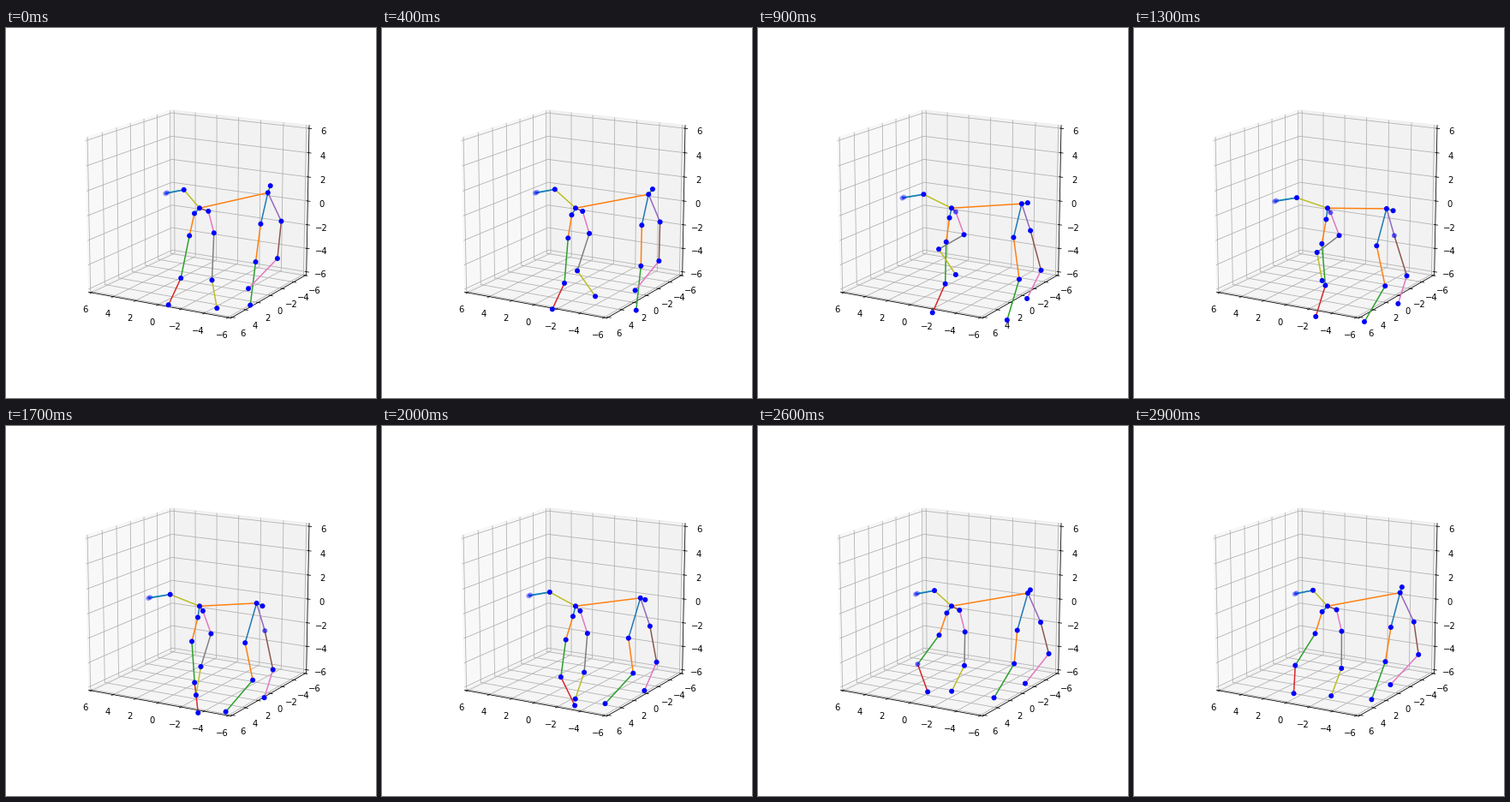
A matplotlib script for the animation above (3 s loop, 432 by 432 pixels).

```python
import numpy as np
import matplotlib.pyplot as plt
from matplotlib.animation import FuncAnimation

SIZE, FRAMES, STEP = 432, 30, 100
STRIDE = 34  # frames in one full stride
ROOT = 226 + 210.3j

# Each joint swings about its anchor once per stride. Screen vectors x + yj:
# rest offset, cosine and sine swing, then the swing at double rate.
JOINTS = {
    "l_hip": ("root", -4 + 9.7j, -2 - 3.5j, 1.4 + 1.3j),
    "l_knee": ("root", -10.4 + 36.7j, -1.4 - 4.5j, 4 + 2.4j),
    "l_hock": ("root", -18.6 + 81.9j, -8 - 3.8j, 15.4 + 10j,
               4.8 + 3.6j, 0.7 + 1.5j),
    "l_toe": ("root", -21.5 + 114.9j, -17.3 - 5.8j, 1.2 + 10.5j,
              2.5 + 3.9j, 6.1),
    "r_hip": ("root", 7.1 + 4.6j, 3.2 - 1j, -1.9 - 0.3j),
    "r_knee": ("root", 15.1 + 30.6j, 1.7 - 1.6j, -0.4 + 0.3j),
    "r_hock": ("root", 4.2 + 68.5j, 6.5 + 6.7j, -14.4 - 10.2j,
               3.8 + 8.9j, 2.4 + 5.8j),
    "r_toe": ("root", 5.8 + 99.8j, 12.2 + 6.5j, 3.5 - 10.3j,
              2.3 + 10.6j, 5.7 + 4.4j),
    "tail": ("root", -26.3 - 17.5j, 8 - 3.9j, -5.6 + 0.7j, 0, -2j),
    "tip_a": ("tail", -21.5 + 3.4j, 2, -1.3),
    "tip_b": ("tip_a", -2 + 1j),
    "chest": ("root", 79.7 - 10.7j, 6.6 - 7.3j, -3 + 4.4j, -6.5, 3.3 - 3j),
    "head": ("chest", 4.9 - 2.4j, -2 - 5.7j, 1.9 + 0.8j),
    "l_elbow": ("chest", -10.9 + 41.4j, 2.5 - 4.9j, 1.7 - 2.5j),
    "l_wrist": ("l_elbow", 1.5 + 43.9j, -7.4 + 0.4j, 4.4 + 5j),
    "l_paw": ("l_wrist", -18.9 + 43.7j, 12.6 + 6.8j, 5.9 + 4.5j),
    "r_elbow": ("chest", 12.6 + 32.7j, 3 + 0.6j, -2.1 - 1.3j),
    "r_wrist": ("r_elbow", 6.5 + 43j, -7 - 1j, 0.8 + 4.7j,
                -4 + 1.5j, -2.8),
    "r_paw": ("r_wrist", -22 + 33.9j, -11.9 + 1.2j, 4.5 - 0.7j),
}
NAMES = ["root", *JOINTS]

# Chains of joints with the colour of each bone.
CHAINS = [
    ("root l_hip l_knee l_hock l_toe", "C0 C1 C2 C3"),
    ("root r_hip r_knee r_hock r_toe", "C5 C6 C7 C8"),
    ("root tail tip_a", "C8 C9"), ("tail tip_b", "C0"),
    ("root chest head", "C1 C2"),
    ("chest l_elbow l_wrist l_paw", "C0 C1 C2"),
    ("chest r_elbow r_wrist r_paw", "C4 C5 C6"),
]
BONES = [bone for chain, colors in CHAINS
         for bone in zip(chain.split(), chain.split()[1:], colors.split())]

# Joints that pass behind their neighbours, with the middle frame of the pass.
BEHIND = {"r_hip": 11, "r_elbow": 15, "l_hock": 24}


def pose(frame):
    """Place of every joint as a complex pixel coordinate."""
    phase = 2 * np.pi * frame / STRIDE
    waves = [1, np.cos(phase), np.sin(phase),
             np.cos(2 * phase), np.sin(2 * phase)]
    joints = {"root": ROOT}
    for name, (anchor, *swings) in JOINTS.items():
        joints[name] = joints[anchor] + sum(
            w * s for w, s in zip(waves, swings))
    return joints


def opacity(name, frame):
    if name.startswith("tip"):
        return 0.3
    if name in BEHIND and abs(frame - BEHIND[name]) <= 3:
        return 0.5
    return 1.0


fig = plt.figure(figsize=(6, 6), dpi=72, facecolor="white")

# Room: unit cube filling a slightly wide box.
room = fig.add_axes([0.125, 0.125, 0.775, 0.755], projection="3d")
room.apply_aspect = lambda position=None: None
room.set_box_aspect((1, 1, 1), zoom=np.sqrt(3) / 1.8294640721620434)
room.view_init(elev=15, azim=120)
ticks = range(-6, 7, 2)
room.set(xticks=ticks, yticks=ticks, zticks=ticks)
room.set(xlim=(-6.25, 6.25), ylim=(-6.25, 6.25), zlim=(-6.25, 6.25))

# Skeleton layer in pixel coordinates.
layer = fig.add_axes([0, 0, 1, 1])
layer.set(xlim=(0, SIZE), ylim=(SIZE, 0))
layer.axis("off")
lines = [layer.plot([], [], color=color, lw=1.5)[0] for _, _, color in BONES]
dots = layer.scatter(np.zeros(len(NAMES)), np.zeros(len(NAMES)), s=20,
                     lw=1.5, color="blue", zorder=3)


def update(frame):
    joints = pose(frame)
    for line, (a, b, _) in zip(lines, BONES):
        ends = np.array([joints[a], joints[b]])
        line.set_data(ends.real, ends.imag)
    places = np.array([joints[name] for name in NAMES])
    colors = [(0, 0, 1, opacity(name, frame)) for name in NAMES]
    dots.set_offsets(np.column_stack([places.real, places.imag]))
    dots.set_facecolor(colors)
    dots.set_edgecolor(colors)
    return [*lines, dots]


anim = FuncAnimation(fig, update, frames=FRAMES, interval=STEP,
                     repeat=True, repeat_delay=0)
plt.show()
```
